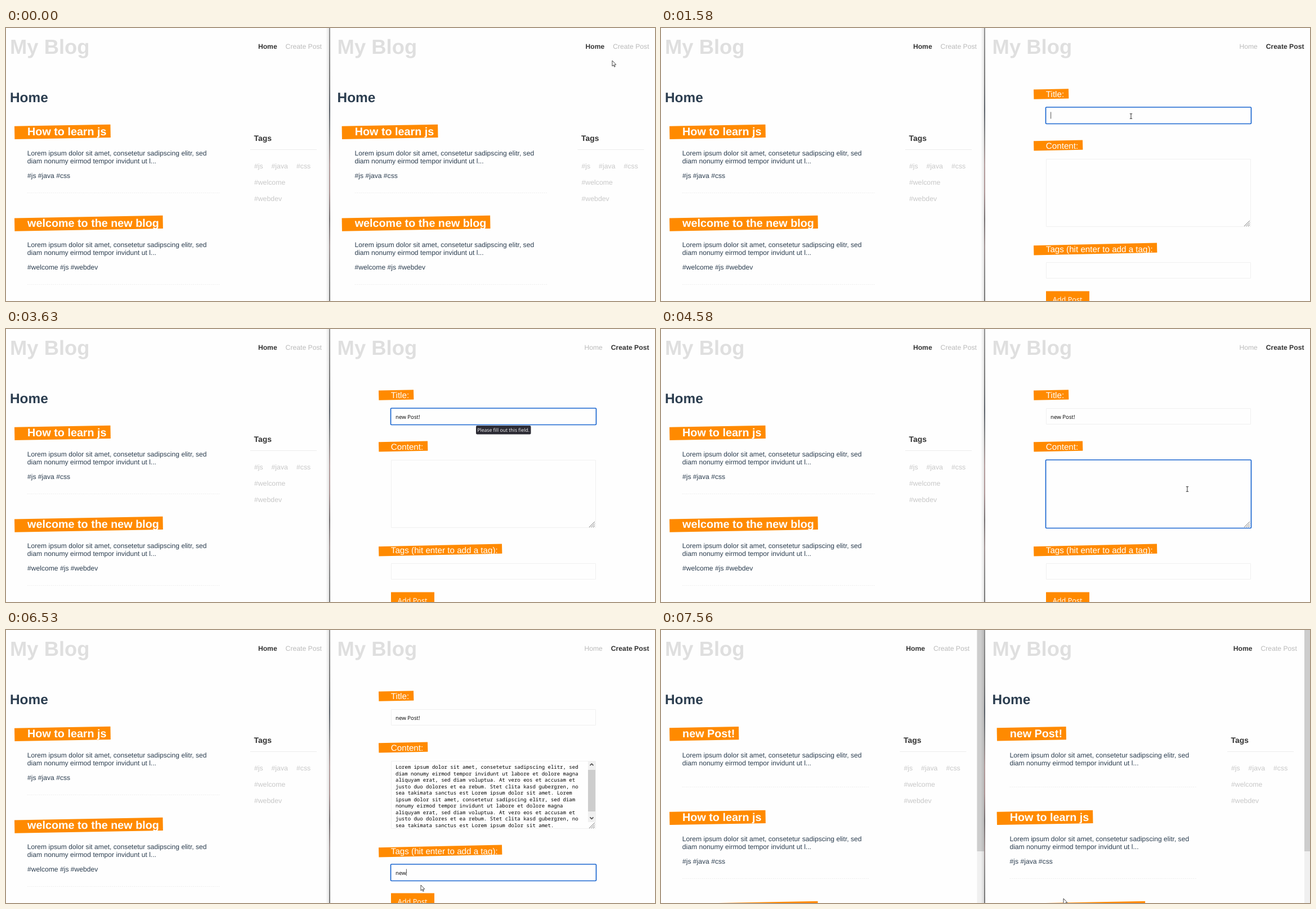
Write an HTML page with a canvas that moves like this. It is 1153 px wide and 486 px high and loops after 8 s.

```html
<!DOCTYPE html>
<html lang="en">
<head>
<meta charset="utf-8">
<title>My Blog</title>
<style>
  html, body { margin: 0; width: 100%; height: 100%; overflow: hidden; background: #fefefe; }
  canvas { display: block; }
</style>
</head>
<body>
<canvas id="stage" width="1153" height="486"></canvas>
<script>
const ctx = document.getElementById('stage').getContext('2d');
const W = 1153, H = 486, LOOP = 8000, STEP = 70;
const PAGE_X = 581.6;
const BG = '#fefefe', ORANGE = '#ff8a00', INK = '#2c3e50', BLUE = '#1a66d0';
const SANS = '"Liberation Sans", Arial, sans-serif';
const UI = '"Open Sans", "Noto Sans", sans-serif';
const MONO = '"Noto Sans Mono", "DejaVu Sans Mono", monospace';

const INTRO = ['Lorem ipsum dolor sit amet, consetetur sadipscing elitr, sed',
  'diam nonumy eirmod tempor invidunt ut l...'];
const LOREM = INTRO[0] + ' diam nonumy eirmod tempor invidunt ut labore et dolore magna ' +
  'aliquyam erat, sed diam voluptua. At vero eos et accusam et justo duo dolores et ea rebum. ' +
  'Stet clita kasd gubergren, no sea takimata sanctus est Lorem ipsum dolor sit amet.';
const BODY = wrap(LOREM + ' ' + LOREM, 60);

const NEW_POST = { title: 'new Post!', w: 123 };
const POSTS = [
  { title: 'How to learn js', w: 170.5, tags: '#js #java #css' },
  { title: 'welcome to the new blog', w: 263.5, tags: '#welcome #js #webdev' }
];

const FIELDS = {
  title: { y: 141, h: 29 },
  content: { y: 233, h: 121 },
  tags: { y: 417, h: 29 }
};

// time at which each character appears
const TITLE_KEYS = [2240, 2370, 2450, 2580, 2840, 3040, 3110, 3240, 3500];
const TAG_KEYS = [5850, 6320, 6390];

// pointer moves: start time, number of steps, end point
const MOVES = [
  [70, 4, 1099, 31],
  [950, 8, 835, 157],
  [4160, 6, 935, 285],
  [4780, 3, 970, 346],
  [4980, 5, 753, 430],
  [6460, 2, 737, 454],
  [6600, 2, 712, 470],
  [7210, 1, 715, 478]
];

function wrap(str, max) {
  const lines = [''];
  for (const word of str.split(' ')) {
    const last = lines[lines.length - 1];
    if (last && last.length + 1 + word.length > max) lines.push(word);
    else lines[lines.length - 1] = last ? last + ' ' + word : word;
  }
  return lines;
}

const between = (t, a, b) => t >= a && t < b;
const typed = (str, keys, t) => str.slice(0, keys.filter(k => t >= k).length);

function text(str, x, y, size, color, weight = '', family = SANS) {
  ctx.font = `${weight} ${size}px ${family}`;
  ctx.fillStyle = color;
  ctx.fillText(str, x, y);
}

function rect(x, y, w, h, color) {
  ctx.fillStyle = color;
  ctx.fillRect(x, y, w, h);
}

function poly(points, fill, stroke, width = 1) {
  ctx.beginPath();
  points.forEach(([x, y]) => ctx.lineTo(x, y));
  ctx.closePath();
  if (fill) { ctx.fillStyle = fill; ctx.fill(); }
  if (stroke) { ctx.strokeStyle = stroke; ctx.lineWidth = width; ctx.stroke(); }
}

function line(x1, y1, x2, y2, color, width = 1, dash = []) {
  ctx.beginPath();
  ctx.setLineDash(dash);
  ctx.moveTo(x1, y1);
  ctx.lineTo(x2, y2);
  ctx.strokeStyle = color;
  ctx.lineWidth = width;
  ctx.stroke();
  ctx.setLineDash([]);
}

// orange band, slightly rising to the right around its centre line
function band(x, mid, w, h, slope) {
  const r = w * slope / 2, k = h / 2;
  poly([[x, mid - k + r], [x + w, mid - k - r], [x + w + 0.4, mid + k - r], [x + 0.4, mid + k + r]], ORANGE);
}

function header(active, shift) {
  text('My Blog', 7, 46, 36.4, '#dfdfdf', 'bold');
  const home = active === 'home';
  const on = ['#333', 'bold'], off = ['#bbb', ''];
  text('Home', (home ? 447.9 : 445.8) - shift, 37, 12.15, ...(home ? on : off));
  text('Create Post', (home ? 496.6 : 493.2) - shift, 37, 12.2, ...(home ? off : on));
}

function post(p, y, right) {
  band(15, y + 0.8, p.w, 23.2, 0.0178);
  text(p.title, 38.1, y + 7, 19.75, '#fff', 'bold');
  INTRO.forEach((s, i) => text(s, 37.8, y + 43 + i * 14, 12.14, INK));
  if (p.tags) text(p.tags, 38, y + 83, 12.14, INK);
  const end = y + (p.tags ? 109.5 : 95.5);
  line(38, end, right, end, '#eee', 1, [2, 1.5]);
  return end + 53.5;
}

function sidebar(x) {
  text('Tags', x - 0.4, 201, 13.9, '#333', 'bold');
  line(x - 7, 216.5, x + 111, 216.5, '#ececec');
  const tags = [['#js', 0, 0], ['#java', 30.6, 0], ['#css', 75, 0], ['#welcome', 0, 1], ['#webdev', 0, 2]];
  tags.forEach(([s, dx, row]) => text(s, x + dx, 250 + row * 29, 12.3, '#c8c8c8'));
}

function homePage(posts, scrolls) {
  header('home', scrolls ? 12.7 : 0);
  text('Home', 7, 132, 24.4, INK, 'bold');
  if (!posts) return;
  let y = 184;
  for (const p of posts) y = post(p, y, scrolls ? 369 : 381);
  sidebar(scrolls ? 431.4 : 440.9);
}

function spinner() {
  ctx.beginPath();
  ctx.arc(866, 178.5, 17, -Math.PI * 0.75, -Math.PI * 0.25);
  ctx.strokeStyle = '#e8862a';
  ctx.lineWidth = 2;
  ctx.stroke();
}

function field({ y, h }, focused) {
  ctx.beginPath();
  if (focused) ctx.roundRect(683.5, y, 365, h + 0.5, 1.5);
  else ctx.rect(684.5, y + 0.5, 363, h - 1);
  ctx.strokeStyle = focused ? BLUE : '#f0f0f0';
  ctx.lineWidth = focused ? 1.7 : 1;
  ctx.stroke();
}

function entry(str, base, caret) {
  text(str, 692, base, 9.7, '#000', '', UI);
  if (caret) rect(692.2 + ctx.measureText(str).width, base - 10, 0.9, 12, '#444');
}

function bodyText() {
  ctx.save();
  ctx.beginPath();
  ctx.rect(685, 234, 362, 119.5);
  ctx.clip();
  BODY.forEach((s, i) => text(s, 692, 247 + i * 11.55, 9.03, '#000', '', MONO));
  ctx.restore();
  rect(1034, 234, 13, 108, '#f0f0f0');
  rect(1034, 249, 13, 74, '#cdcdcd');
  for (const [y, d] of [[239.5, 1], [335, -1]]) {
    ctx.beginPath();
    ctx.moveTo(1037.5, y + 1.7 * d);
    ctx.lineTo(1040.5, y - 1.3 * d);
    ctx.lineTo(1043.5, y + 1.7 * d);
    ctx.strokeStyle = '#505050';
    ctx.lineWidth = 1.7;
    ctx.stroke();
  }
}

function tooltip() {
  ctx.beginPath();
  ctx.roundRect(835, 172, 97.5, 15.5, 2);
  ctx.fillStyle = '#2b2a33';
  ctx.fill();
  text('Please fill out this field.', 837.2, 183, 8.7, '#fafafa', '', UI);
}

function focusAt(t) {
  if (between(t, 1510, 4570)) return 'title';
  if (between(t, 4570, 5390)) return 'content';
  if (between(t, 5390, 7000)) return 'tags';
  return '';
}

function formPage(t) {
  const labels = [['Title:', 117.5, 62, 122.8], ['Content:', 209, 87, 214.5], ['Tags (hit enter to add a tag):', 393.5, 219, 399]];
  for (const [s, mid, w, base] of labels) {
    band(662, mid, w, 17.2, 0.022);
    text(s, 683.8, base, 15.2, '#fff');
  }
  const focus = focusAt(t);
  if (t >= 4780) bodyText();
  for (const name in FIELDS) field(FIELDS[name], name === focus);
  for (const d of [10, 6.5, 3]) line(1046 - d, 353, 1046, 353 - d, '#666', 0.9);

  entry(typed('new Post!', TITLE_KEYS, t), 159.5, between(t, 1580, 2040) || between(t, 2240, 3630));
  entry(typed('new', TAG_KEYS, t), 435.5, between(t, 5450, 7000));

  rect(684, 468.5, 77, 18, ORANGE);
  text('Add Post', 695.8, 487.5, 12.7, '#fff', '', UI);
  if (between(t, 2040, 4160)) tooltip();
}

function pointerAt(t) {
  let x = 1077, y = 58;
  for (const [start, n, ex, ey] of MOVES) {
    if (t < start) break;
    const p = Math.min(1, (Math.floor((t - start) / STEP) + 1) / n);
    x += (ex - x) * p;
    y += (ey - y) * p;
  }
  return [x, y];
}

function arrow(x, y) {
  const shape = [[0, 0], [0, 10], [2.3, 7.9], [3.8, 11.3], [5.3, 10.6], [3.8, 7.4], [6.8, 7.2]];
  poly(shape.map(([a, b]) => [x + a, y + b]), '#fff', '#333', 0.9);
}

function hand(x, y) {
  ctx.beginPath();
  ctx.roundRect(x - 1, y, 2.2, 9, 1);
  ctx.roundRect(x - 1.5, y + 5, 7.5, 8, 2);
  ctx.moveTo(x - 1, y + 10.5);
  ctx.lineTo(x - 3.5, y + 7);
  ctx.lineTo(x - 1, y + 7.5);
  ctx.strokeStyle = '#333';
  ctx.lineWidth = 1.5;
  ctx.stroke();
  ctx.fillStyle = '#fff';
  ctx.fill();
}

function ibeam(x, y) {
  line(x, y - 4, x, y + 4, '#333', 1);
  line(x - 2.2, y - 4.3, x + 2.2, y - 4.3, '#333', 1);
  line(x - 2.2, y + 4.3, x + 2.2, y + 4.3, '#333', 1);
}

function pointer(t, onForm) {
  if (between(t, 2240, 4160) || between(t, 5850, 6460)) return;
  const [x, y] = pointerAt(t);
  const inField = Object.values(FIELDS).some(f => between(y, f.y, f.y + f.h));
  const onLink = y < 40 || (onForm && t < 7210 && y >= 468);
  if (onLink) hand(x, y);
  else if (onForm && inField && between(x, 684, 1048)) ibeam(x, y);
  else arrow(x, y);
}

function scrollbar(x, w) {
  rect(x, 0, w, H, '#f0f0f0');
  rect(x, 0, w, 394, '#cdcdcd');
}

function divider(scrolls) {
  if (scrolls) scrollbar(561.5, 13);
  const shade = ctx.createLinearGradient(568, 0, 574, 0);
  shade.addColorStop(0, 'rgba(0,0,0,0)');
  shade.addColorStop(1, 'rgba(0,0,0,0.1)');
  rect(568, 0, 6, H, shade);
  const edge = ctx.createLinearGradient(0, 0, 0, H);
  ['#777', '#666', '#555', '#333a44', '#666', '#a08484', '#9a7c7c', '#504a4c', '#877', '#666', '#555']
    .forEach((c, i, all) => edge.addColorStop(i / (all.length - 1), c));
  rect(574.2, 0, 1.6, H, edge);
}

function draw(t) {
  ctx.textRendering = 'geometricPrecision';
  const done = t >= 7560;
  const onForm = between(t, 550, 7490);
  const posts = done ? [NEW_POST, ...POSTS] : POSTS;
  rect(0, 0, W, H, BG);
  homePage(posts, done);
  ctx.save();
  ctx.translate(PAGE_X, 0);
  if (onForm) header('create', 0);
  else homePage(between(t, 7490, 7560) ? null : posts, done);
  ctx.restore();
  if (onForm) formPage(t);
  if (between(t, 7490, 7560)) spinner();
  divider(done);
  if (done) scrollbar(1143, 10);
  pointer(t, onForm);
}

const begin = performance.now();
function tick() {
  draw((performance.now() - begin) % LOOP);
  requestAnimationFrame(tick);
}
tick();
</script>
</body>
</html>
```
